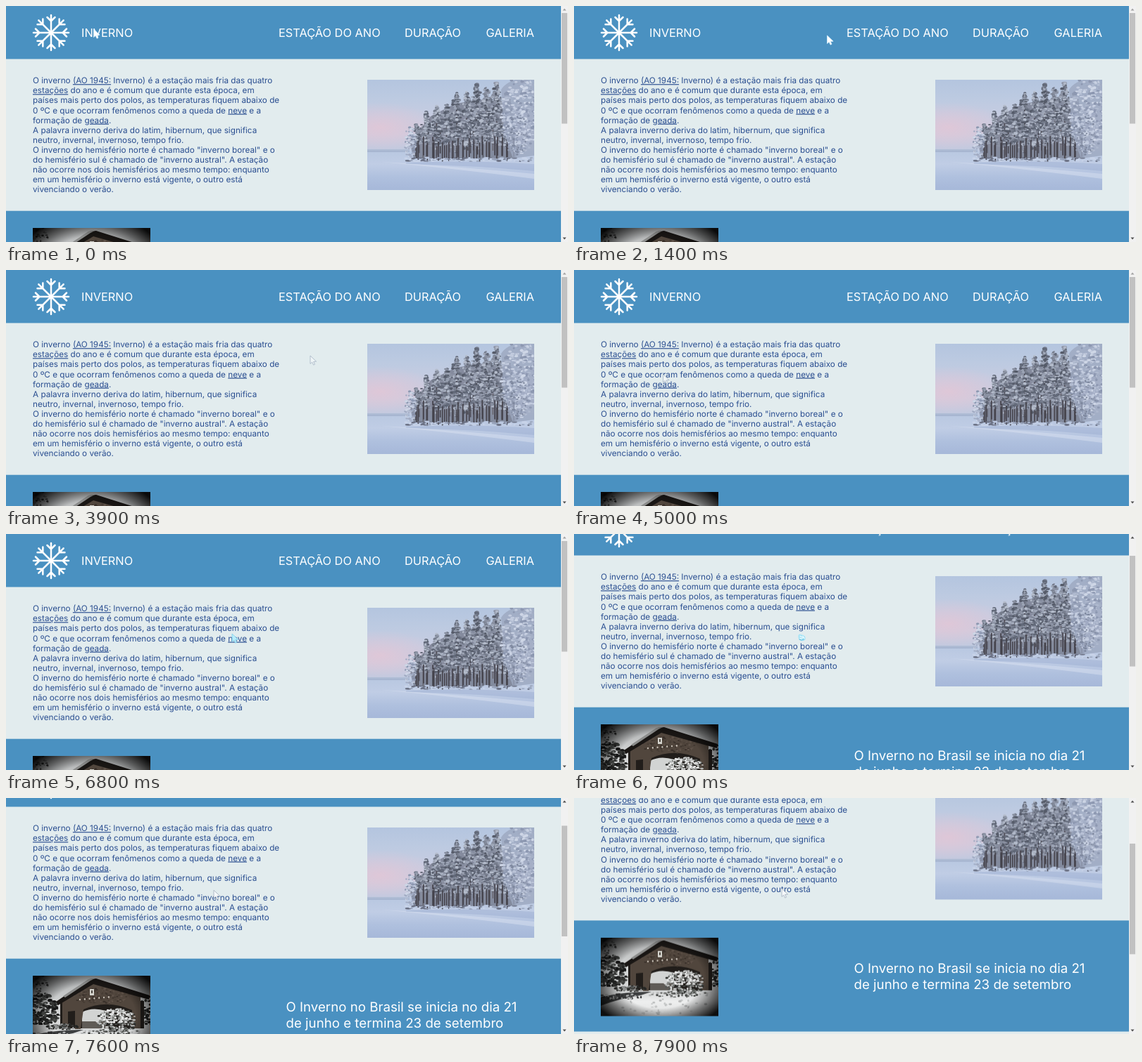
These frames come from a looping animation (798x336 px, 8 s). An HTML page with a canvas:

```html
<!DOCTYPE html>
<html lang="pt">
<head>
<meta charset="utf-8">
<title>Inverno</title>
<style>
  html, body { margin: 0; width: 100%; height: 100%; overflow: hidden; background: #e2ecee; }
  #stage { position: relative; width: 798px; height: 336px; overflow: hidden; }
  #page { position: absolute; left: 0; top: 0; width: 788px; height: 680px; }
  #page > *, #overlay { position: absolute; left: 0; top: 0; }
  #trees { left: 513px; top: 105px; }
  #lodge { left: 38px; top: 315.5px; }
  text { font-family: Inter, "Open Sans", sans-serif; white-space: pre; text-rendering: geometricPrecision; }
  .nav { font-size: 16.36px; fill: #fff; }
  .body { font-size: 11.72px; fill: #2b4f91; }
  .body .link { text-decoration: underline; }
  .lead { font-size: 18.69px; fill: #fff; }
</style>
</head>
<body>
<div id="stage">
  <div id="page">
    <svg id="layout" width="788" height="680">
      <rect width="788" height="680" fill="#e2ecee"/>
      <rect width="788" height="75.5" fill="#4a91c1"/>
      <rect y="291.7" width="788" height="158.1" fill="#4a91c1"/>
      <g id="flake" transform="translate(64 38)" fill="none" stroke="#fff" stroke-width="2.5" stroke-linecap="round"/>
      <g class="nav">
        <text x="107" y="44">INVERNO</text>
        <text x="387" y="44">ESTAÇÃO DO ANO</text>
        <text x="566" y="44">DURAÇÃO</text>
        <text x="681.5" y="44">GALERIA</text>
      </g>
      <g id="copy" class="body"></g>
      <g class="lead">
        <text x="397.5" y="366.5">O Inverno no Brasil se inicia no dia 21</text>
        <text x="397.5" y="389.6">de junho e termina 23 de setembro</text>
      </g>
    </svg>
    <canvas id="trees" width="237" height="157"></canvas>
    <canvas id="lodge" width="167" height="112"></canvas>
  </div>
  <svg id="overlay" width="798" height="336">
    <rect x="788" width="10" height="336" fill="#f1f1f1"/>
    <path d="M790.5 6.5l2.5-3 2.5 3z" fill="#a3a3a3" id="up"/>
    <path d="M790.5 329.5l2.5 3 2.5-3z" fill="#505050"/>
    <rect id="thumb" x="789" y="10" width="8" height="157.5" fill="#c1c1c1"/>
    <g id="cursor">
      <path id="arrow" d="M0 0V11.5L2.7 9.2 4.6 13.2 6.5 12.3 4.7 8.5 8.6 8.2Z" stroke-width=".8" stroke-linejoin="round"/>
      <g id="hand">
        <path d="M0 4Q0 0 3 1L7 2Q11 4 10 8 8 11 4 10 0 9 0 4Z" fill="#a5e3f5"/>
        <path d="M2 3l5 3M2 6l4 2M6 3l3 4" stroke="#f2fcff" stroke-width="1.2" fill="none"/>
        <path d="M1 8l3 1 4-1" stroke="#65bfe0" fill="none"/>
      </g>
    </g>
  </svg>
</div>
<script>
const $ = id => document.getElementById(id);
const LOOP = 8000, STEP = 100;

// Underlined words stand between square brackets.
const copy = `O inverno [(AO 1945:] Inverno) é a estação mais fria das quatro
[estações] do ano e é comum que durante esta época, em
países mais perto dos polos, as temperaturas fiquem abaixo de
0 ºC e que ocorram fenômenos como a queda de [neve] e a
formação de [geada].
A palavra inverno deriva do latim, hibernum, que significa
neutro, invernal, invernoso, tempo frio.
O inverno do hemisfério norte é chamado "inverno boreal" e o
do hemisfério sul é chamado de "inverno austral". A estação
não ocorre nos dois hemisférios ao mesmo tempo: enquanto
em um hemisfério o inverno está vigente, o outro está
vivenciando o verão.`;
$('copy').innerHTML = copy.split('\n').map((line, i) =>
  `<text x="38" y="${110.2 + i * 14.1}">${line.replace(/\[(.+?)\]/g, '<tspan class="link">$1</tspan>')}</text>`).join('');

$('flake').innerHTML = Array.from({ length: 8 }, (_, i) =>
  `<path transform="rotate(${i * 45})" d="M0 0V-25M-5.5 -22L0 -16.5 5.5 -22"/>`).join('');

function randomizer(seed) {
  return () => {
    seed = (seed * 1664525 + 1013904223) >>> 0;
    return seed / 4294967296;
  };
}

function painter(id, seed) {
  const c = $(id).getContext('2d'), rand = randomizer(seed);
  const between = (a, b) => a + (b - a) * rand();
  const pick = list => list[Math.floor(rand() * list.length)];
  const blob = (x, y, rx, ry, color) => {
    c.fillStyle = color;
    c.beginPath();
    c.ellipse(x, y, rx, ry, 0, 0, 7);
    c.fill();
  };
  return {
    c, between, pick, blob,
    gradient(x, y, w, h, ...stops) {
      const g = c.createLinearGradient(0, y, 0, y + h);
      stops.forEach((s, i) => g.addColorStop(i / (stops.length - 1), s));
      c.fillStyle = g;
      c.fillRect(x, y, w, h);
    },
    // Elliptical glow: radii are measured along x, flat scales y.
    glow(x, y, r0, r1, flat, ...stops) {
      const g = c.createRadialGradient(0, 0, r0, 0, 0, r1);
      stops.forEach((s, i) => g.addColorStop(i / (stops.length - 1), s));
      c.save();
      c.translate(x, y);
      c.scale(1, flat);
      c.fillStyle = g;
      c.fillRect(-400, -400, 800, 800);
      c.restore();
    },
    shape(color, path) {
      c.fillStyle = color;
      c.fill(new Path2D(path));
    },
    // Fills an ellipse with small random dabs.
    speckle(count, x, y, rx, ry, size, colors) {
      for (let i = 0; i < count; i++) {
        const a = between(0, 2 * Math.PI), r = Math.sqrt(between(0, 1));
        blob(x + Math.cos(a) * r * rx, y + Math.sin(a) * r * ry,
          size * between(.5, 1.3), size * between(.3, .9), pick(colors));
      }
    }
  };
}

function paintTrees() {
  const p = painter('trees', 11), { c, between, pick, blob } = p;
  p.gradient(0, 0, 237, 103, '#b4c5df', '#bccae1', '#c6cce1', '#cbcde0', '#bdc9e0');
  p.glow(18, 68, 0, 85, .42, 'rgba(226,198,214,.85)', 'rgba(226,198,214,0)');
  p.gradient(0, 102, 237, 55, '#b9c8e1', '#c0cde5', '#afc0de', '#a6b8d9');
  p.gradient(0, 99, 60, 4, '#b2bfd6', '#a4b3cf');
  p.shape('rgba(140,161,201,.35)', 'M55 118Q150 114 237 120V130Q150 122 55 120Z');
  p.shape('rgba(218,226,242,.5)', 'M20 117Q120 123 237 134V141Q120 126 20 117Z');

  c.filter = 'blur(.5px)';
  const dusky = ['#636a7a', '#777e8e', '#8b92a3', '#9da5b6', '#b3bbca', '#555b69'];
  const frosty = ['#a0aac2', '#b1bbd0', '#c2cbde', '#ced6e6', '#8d98b1'];

  // A trunk with snow-laden tiers of branches.
  const fir = (x, top, width, tones) => {
    c.fillStyle = '#4a4850';
    c.fillRect(x - .8, top + 12, 1.7, 112 - top - 12);
    for (let y = top; y < 92; y += 3.4) {
      const f = (y - top) / (92 - top);
      const reach = width * (.2 + .8 * Math.sin(Math.PI * Math.min(.75, f)));
      p.speckle(9, x + between(-.35, .35) * reach, y, reach * .75, 3, 2.4, tones);
    }
  };
  p.shape('rgba(112,118,135,.75)', 'M60 88L90 52 125 34 165 28 205 34 212 112H66Z');
  p.speckle(150, 140, 76, 72, 28, 2.4, dusky);
  for (let x = 68; x < 214; x += between(4, 8)) {
    c.fillStyle = pick(['#403e46', '#50505a', '#605d63']);
    c.fillRect(x, between(68, 86), between(.8, 1.8), 30);
  }
  const tops = [66, 48, 40, 38, 22, 20, 9, 14, 6, 20];
  tops.forEach((top, i) => fir(70 + i * 14.2, top, 9 + i * .35, dusky));
  for (let x = 72; x < 210; x += 7.1) {
    c.fillStyle = '#45434c';
    c.fillRect(x + between(-2, 2), between(80, 90), 1.7, 27);
  }

  p.shape('rgba(157,168,192,.8)', 'M190 14Q201 -3 237 -4V108L207 112Q199 93 194 70Z');
  p.speckle(420, 217, 48, 27, 57, 2.4, frosty);
  p.speckle(100, 212, 75, 18, 32, 1.7, ['#7d879d', '#929cb2', '#bec8da']);
  p.speckle(100, 61, 89, 8, 22, 2, frosty);
  for (let x = 55; x < 237; x += 2)
    blob(x, between(111, 116), between(1.5, 4), between(.6, 1.5), pick(['#6b7184', '#98a3ba', '#bac7df', '#c8d3e8']));
}

function paintLodge() {
  const p = painter('lodge', 29), { c, between, blob } = p;
  const dark = ['#171717', '#232423', '#343533', '#484a48'];
  c.filter = 'blur(.4px)';
  p.gradient(0, 0, 167, 75, '#a8aaab', '#d2d4d4', '#d9dada');
  p.speckle(190, 10, 50, 28, 25, 3, dark);
  p.speckle(60, 8, 22, 15, 25, 2, ['#303130', '#535553', '#858786']);
  p.speckle(100, 164, 54, 14, 25, 2.5, dark);
  p.gradient(0, 70, 167, 42, '#c8caca', '#eeefef', '#e0e1e1');

  p.shape('#211d1a', 'M39 36H158V75H39Z');
  p.shape('#d2d4d3', 'M70 75V52Q84 44 104 50V75Z');
  p.shape('#5f5b56', 'M70 65H104V75H70Z');
  p.shape('#51463d', 'M42 37L84 10 153 29V75H141V49Q105 33 72 48L68 76H60V50L50 51V76H42Z');
  p.speckle(150, 98, 29, 42, 12, 1.5, ['#473d35', '#60534a', '#3a312b']);
  p.shape('#191614', 'M33 37L80 5 90 4 166 28 165 34 86 12 36 42Z');
  p.shape('#8b8c8b', 'M43 29L79 5 88 4 82 7 46 31Z');
  c.fillStyle = '#d3d2cc';
  c.fillRect(81, 19, 6, 9);
  c.fillStyle = '#4d4640';
  c.fillRect(83, 21, 2, 4);
  for (let i = 0; i < 7; i++) blob(67 + i * 6.8, 34 - i * .6, 1.1, 1.3, '#c9c2b8');

  p.speckle(70, 42, 73, 23, 4, 2, ['#242523', '#454745', '#8d8f8f']);
  p.shape('#3c3e3f', 'M0 85Q30 77 72 77L57 82Q25 87 0 97Z');
  p.speckle(50, 28, 84, 30, 4, 2, ['#2b2c2d', '#555758', '#aeb0b0']);
  p.speckle(230, 119, 65, 28, 18, 2, ['#2d2f2d', '#555855', '#878987', '#b9bbba', '#dedfdf']);
  p.speckle(110, 117, 58, 23, 10, 1.8, ['#a4a7a5', '#d9dbda', '#eeeeee']);
  p.speckle(60, 112, 81, 47, 4, 1.7, ['#363836', '#626462', '#b4b6b6']);
  p.speckle(50, 83, 98, 70, 11, 2, ['#c5c7c7', '#e9eaea', '#b6b8b8']);
  p.glow(84, 56, 62, 106, .72, 'rgba(0,0,0,0)', 'rgba(0,0,0,.5)', 'rgba(0,0,0,.94)');
}

paintTrees();
paintLodge();

// [time, scroll offset]
const scrollSteps = [[0, 0], [6800, 0], [6900, 12], [7000, 45], [7100, 57], [7200, 59],
  [7500, 59], [7600, 63], [7700, 88], [7800, 113], [7900, 117.3]];

// [time, x, y]
const cursorSteps = [[0, 124.5, 33], [600, 118, 36], [800, 70, 42], [1600, 456, 42], [1700, 458, 40],
  [2500, 702, 38], [2800, 671.5, 169], [3100, 610, 190], [3400, 520, 150], [3700, 440, 126],
  [3900, 432, 122], [4300, 250, 100], [4700, 136, 122], [5000, 126.5, 148.5], [5300, 210, 205],
  [5600, 330, 205], [6100, 322, 146], [6800, 321, 142], [7000, 318.5, 142], [7200, 304, 136],
  [7500, 295, 132], [7900, 295, 129]];

// [start, fill, stroke]; no fill shows the hand
const looks = [[0, '#fff', '#d4eefb'], [2600, '#e0f8ff', '#45b8e4'], [3500, '#eef4f6', '#a5b3c3'],
  [6400, '#b9edfa', '#7fd1ec'], [6900], [7200, '#f5f8fa', '#a3aebd']];

function sample(table, t) {
  const next = table.findIndex(row => row[0] > t);
  if (next < 0) return table[table.length - 1].slice(1);
  const a = table[next - 1], b = table[next], f = (t - a[0]) / (b[0] - a[0]);
  return a.slice(1).map((v, i) => v + (b[i + 1] - v) * f);
}

function render(now) {
  const t = Math.floor((now % LOOP) / STEP) * STEP;
  const [scroll] = sample(scrollSteps, t), [x, y] = sample(cursorSteps, t);
  const [, fill, stroke] = looks.filter(look => look[0] <= t).pop();
  $('page').style.transform = `translateY(${-scroll}px)`;
  $('thumb').setAttribute('y', 10 + scroll * .468);
  $('up').setAttribute('fill', scroll ? '#505050' : '#a3a3a3');
  $('cursor').setAttribute('transform', `translate(${x} ${y})`);
  $('arrow').style.display = fill ? '' : 'none';
  $('hand').style.display = fill ? 'none' : '';
  if (fill) {
    $('arrow').setAttribute('fill', fill);
    $('arrow').setAttribute('stroke', stroke);
  }
}

const start = performance.now();
function tick() {
  render(performance.now() - start);
  requestAnimationFrame(tick);
}
tick();
</script>
</body>
</html>
```
